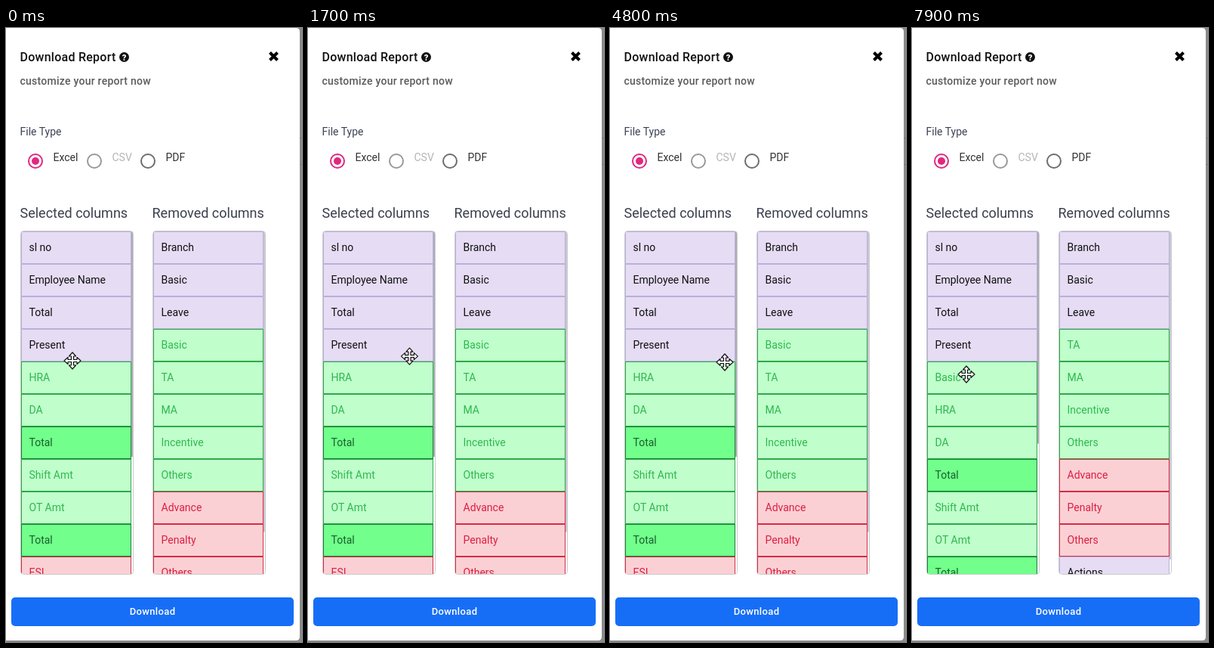
An HTML page that plays this animation: 392 by 812 pixels, repeating every 8000 ms.

```html
<!DOCTYPE html>
<html lang="en">
<head>
<meta charset="utf-8">
<title>Download Report</title>
<style>
html, body { margin: 0; width: 100%; height: 100%; overflow: hidden; background: #8b8b8b; }
svg { display: block; width: 392px; height: 812px; font: 14px Roboto, sans-serif; cursor: default; }
.medium { font-weight: 500; letter-spacing: .25px; }
.lifted { filter: drop-shadow(0 3px 5px rgba(0, 0, 0, .45)); }
</style>
</head>
<body>
<svg id="stage" viewBox="0 0 392 812">
  <defs>
    <clipPath id="clipL"><rect x="20" y="269" width="148" height="453" rx="3"/></clipPath>
    <clipPath id="clipR"><rect x="195" y="269" width="148" height="453" rx="3"/></clipPath>
  </defs>
  <path d="M389 145.5h3M389 180.5h3" stroke="#777"/>
  <path d="M0 0H384Q389 0 389 5V805Q389 810 384 810H0Z" fill="#fff"/>

  <text class="medium" x="18.500" y="44" font-size="16" fill="#111">Download Report</text>
  <circle cx="156.500" cy="38.500" r="6.500" fill="#111"/>
  <text x="156.500" y="42.500" font-size="11" font-weight="900" text-anchor="middle" fill="#fff">?</text>
  <path d="M349.500 32.500l10 10m0-10l-10 10" stroke="#000" stroke-width="4"/>
  <text class="medium" x="18.500" y="75" fill="#5c5c5c">customize your report now</text>
  <text x="18.500" y="142" fill="#3c4257">File Type</text>

  <g fill="none" stroke-width="2">
    <circle cx="39" cy="176" r="9" stroke="#e0287d"/>
    <circle cx="39" cy="176" r="5" fill="#e0287d"/>
    <circle cx="117" cy="176" r="9" stroke="#999"/>
    <circle cx="188" cy="176" r="9" stroke="#6d6d6d"/>
  </g>
  <text x="62.500" y="176" fill="#333">Excel</text>
  <text x="140.500" y="176" fill="#b5b5b5">CSV</text>
  <text x="211.500" y="176" fill="#333">PDF</text>

  <g font-size="18" fill="#3a3f4d">
    <text x="18.500" y="251">Selected columns</text>
    <text x="193.500" y="251">Removed columns</text>
  </g>
  <g fill="#fff" stroke="#ccc">
    <rect x="19.500" y="268.500" width="149" height="454" rx="4"/>
    <rect x="194.500" y="268.500" width="149" height="454" rx="4"/>
  </g>
  <g id="left" clip-path="url(#clipL)"></g>
  <g id="right" clip-path="url(#clipR)"></g>

  <rect x="7" y="753" width="374" height="38" rx="5" fill="#176ef6"/>
  <text x="194" y="776" font-size="13" font-weight="500" letter-spacing=".35" text-anchor="middle" fill="#fff">Download</text>

  <g id="dragged"></g>
  <g fill="#fff" stroke="#111" stroke-width="1.200" stroke-linejoin="round">
    <path id="move" d="M0-11l4.500 5H1.500v4.500H6V-4.500L11 0 6 4.500V1.500H1.500V6h3L0 11-4.500 6h3V1.500H-6v3L-11 0-6-4.500v3h4.500V-6h-3Z"/>
    <path id="arrow" d="M0 0V16l3.700-3.500 2.500 5.800 2.700-1.200-2.500-5.600H11Z"/>
  </g>
</svg>
<script>
const $ = id => document.getElementById(id);
const ROW = 43, TOP = 269, VIEW = 453;

// fill, border, text
const styles = {
  p: ['#e6dcf4', '#b9b0da', '#111'],
  g: ['#c0ffcc', '#2bab47', '#2eb84d'],
  G: ['#72ff8b', '#168034', '#17612d'],
  r: ['#fbd0d4', '#d52c46', '#dc1f42'],
  R: ['#ff8592', '#a3122b', '#7d1022']
};

function add(parent, tag, attrs, label) {
  const el = document.createElementNS('http://www.w3.org/2000/svg', tag);
  for (const k in attrs) el.setAttribute(k, attrs[k]);
  if (label) el.textContent = label;
  return parent.appendChild(el);
}

function makeRow(parent, spec) {
  const [kind, label] = spec.split(':'), [fill, stroke, color] = styles[kind];
  const row = add(parent, 'g', {});
  add(row, 'rect', { x: .5, y: .5, width: 145, height: 42, fill, stroke });
  add(row, 'text', { x: 10.5, y: 26, fill: color }, label);
  return row;
}

function makeList(id, x, specs) {
  const rows = specs.split(',').map(s => makeRow($(id), s));
  const thumb = add($(id), 'rect', { x: x + 146, width: 2.5, rx: 1 });
  return { x, rows, thumb };
}

const left = makeList('left', 20, 'p:sl no,p:Employee Name,p:Total,p:Present,g:HRA,g:DA,G:Total,' +
  'g:Shift Amt,g:OT Amt,G:Total,r:ESI,r:PF,r:TDS,R:Total,p:Net Pay,p:Remarks');
const right = makeList('right', 195, 'p:Branch,p:Basic,p:Leave,g:Basic,g:TA,g:MA,g:Incentive,' +
  'g:Others,r:Advance,r:Penalty,r:Others,p:Actions');
makeRow($('dragged'), 'g:Basic');

const place = (el, x, y) => el.setAttribute('transform', `translate(${x} ${y})`);
const ease = p => p * p * (3 - 2 * p);

// Each key is [time, ...values]
function track(keys, t) {
  let i = 1;
  while (i < keys.length - 1 && t > keys[i][0]) i++;
  const a = keys[i - 1], b = keys[i];
  const p = ease(Math.min(1, Math.max(0, (t - a[0]) / (b[0] - a[0]))));
  return a.slice(1).map((v, k) => v + (b[k + 1] - v) * p);
}

const cursorPath = [[0, 88, 440], [1200, 88, 438], [1500, 88, 438], [2150, 292, 421],
  [2500, 292, 421], [3000, 289, 422], [3800, 289, 422], [4500, 152, 442], [4850, 152, 442],
  [5350, 248, 415], [5500, 248, 415], [6300, 73, 458], [7000, 73, 458], [7300, 72, 458]];
const leftScroll = [[100, 0], [600, 235], [800, 235], [1200, 14], [1300, 0]];
const rightScroll = [[2200, 0], [2300, 16], [2450, 63], [2650, 63], [2900, 0]];
const transfer = [[5950, 0], [6150, 1]];

function drawList(list, scroll, from, shift, hovered) {
  const size = list.rows.length * ROW + shift;
  list.rows.forEach((row, i) =>
    place(row, list.x, TOP + i * ROW - scroll + (i >= from ? shift : 0)));
  list.thumb.setAttribute('y', TOP + scroll * VIEW / size);
  list.thumb.setAttribute('height', VIEW * VIEW / size);
  list.thumb.setAttribute('fill', hovered ? '#adadb8' : '#c8c6d2');
}

function draw(t) {
  const [x, y] = track(cursorPath, t), [moved] = track(transfer, t);
  drawList(left, track(leftScroll, t)[0], 4, ROW * moved, x < 180);
  drawList(right, track(rightScroll, t)[0], 4, -ROW * moved, x >= 180);

  const taken = t >= 5500, held = taken && t < 7000;
  right.rows[3].style.display = taken ? 'none' : '';
  $('dragged').style.display = taken ? '' : 'none';
  $('dragged').setAttribute('class', held ? 'lifted' : '');
  place($('dragged'), held ? x - 53 : 20, held ? y - 17 : 441);

  $('arrow').style.display = held ? '' : 'none';
  $('move').style.display = held ? 'none' : '';
  place($('arrow'), x, y);
  place($('move'), x, y);
}

const start = performance.now();
function tick() {
  draw((performance.now() - start) % 8000);
  requestAnimationFrame(tick);
}
tick();
</script>
</body>
</html>
```
